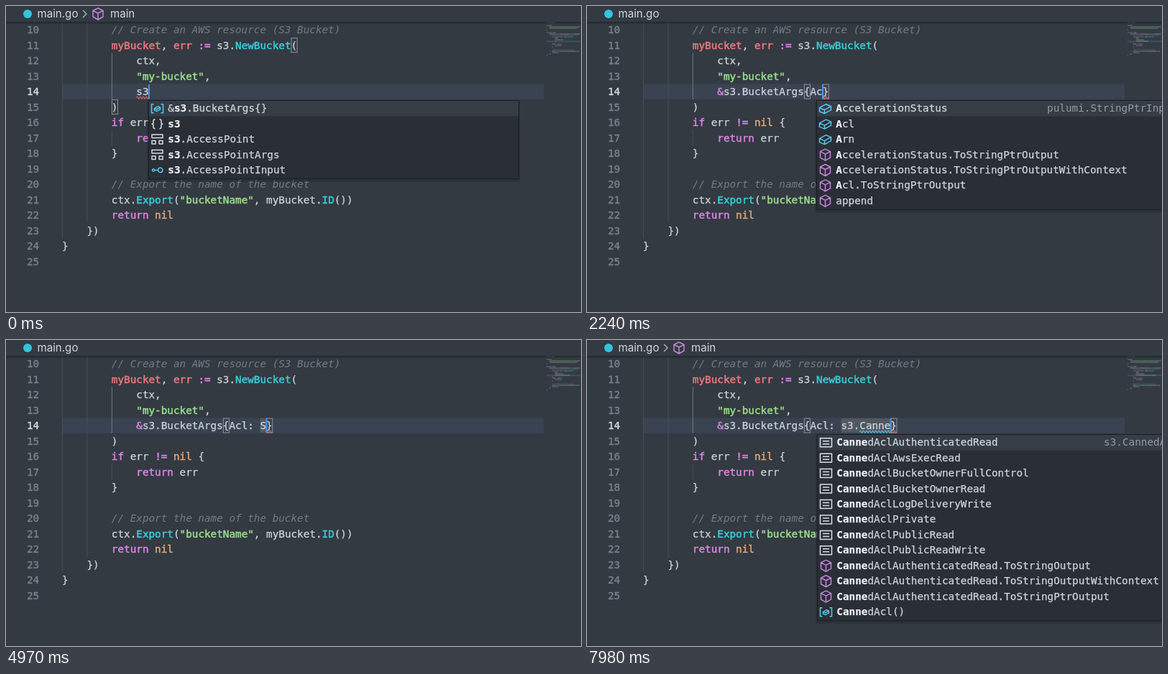
These frames come from a looping animation (800x426 px, 8000 ms). An HTML page:

```html
<!DOCTYPE html>
<html lang="en">
<head>
<meta charset="utf-8">
<title>Editor completion</title>
<style>
html, body { margin: 0; width: 100%; height: 100%; overflow: hidden; background: #333a42; }
svg { display: block; width: 100vw; height: 100vh; }
text { font: 14.3px "DejaVu Sans Mono", monospace; white-space: pre; }
#popup text { font-size: 14.34px; }
.ui { font: 15.1px Inter, sans-serif; fill: #d3d7de; }
.icon { fill: none; stroke-width: 1.5; stroke-linejoin: round; }
</style>
</head>
<body>
<svg viewBox="0 0 800 426">
  <defs>
    <linearGradient id="shade" x2="0" y2="1">
      <stop stop-color="#1d2026" stop-opacity=".75"/>
      <stop offset="1" stop-color="#1d2026" stop-opacity="0"/>
    </linearGradient>
  </defs>
  <rect width="800" height="426" fill="#333a42"/>
  <g id="back"></g>
  <g id="line"></g>
  <g id="map"></g>
  <rect y="22" width="800" height="4" fill="url(#shade)"/>
  <circle cx="30" cy="11" r="6" fill="#35c3dc"/>
  <text class="ui" x="43.5" y="16">main.go</text>
  <g id="crumb">
    <path d="M107 6l5 5-5 5" fill="none" stroke="#aeb4bf" stroke-width="1.4"/>
    <text class="ui" x="145" y="16">main</text>
  </g>
  <g id="popup"></g>
</svg>
<script>
const LOOP = 8000, CW = 8.609, LH = 21.5, ROW = 21.45, LEFT = 78;
const $ = id => document.getElementById(id);
const colors = {
  w: '#d0d4da', c: '#737b86', r: '#ee777e', p: '#dc83e2',
  b: '#38cbd8', g: '#9bdc8c', o: '#e5a577'
};

// Source lines: indent, then "colour:text" parts split by "|"
const lines = [
  '0|p:package|w: main', '', '0|p:import|w: (',
  '4|g:"github.com/pulumi/pulumi-aws/sdk/go/aws/s3"',
  '4|g:"github.com/pulumi/pulumi/sdk/go/pulumi"',
  '0|w:)', '', '0|p:func|b: main|w:() {',
  '4|w:pulumi.|b:Run|w:(|p:func|w:(ctx *pulumi.|b:Context|w:) error {',
  '8|c:// Create an AWS resource (S3 Bucket)',
  '8|r:myBucket|w:, |r:err|p: := |w:s3.|b:NewBucket|w:(',
  '12|w:ctx,', '12|g:"my-bucket"|w:,', '',
  '8|w:)', '8|p:if|w: err |p:!=|o: nil|w: {', '12|p:return|w: err', '8|w:}', '',
  '8|c:// Export the name of the bucket',
  '8|w:ctx.|b:Export|w:(|g:"bucketName"|w:, myBucket.|b:ID|w:())',
  '8|p:return|o: nil', '4|w:})', '0|w:}', ''
];

const icons = {
  cube: ['#c583da', 'M0-8L7-4.5V4L0 8L-7 4V-4.5ZM-7-4.5L0-1L7-4.5M0-1V8'],
  field: ['#5cc4ee', 'M-8-1L1-6L8-3V2L-1 7L-8 4ZM-8-1L-1 2L8-3M-1 2V7'],
  value: ['#5cc4ee', 'M-5-6H-8V6H-5M5-6H8V6H5M-4 0L1-3L4-1.5V1.5L-1 4L-4 2.5ZM-4 0L-1 1.2L4-1.5'],
  braces: ['#d8dce3', 'M-3-6.5Q-5.5-6.5-5.5-4V-2Q-5.5 0-7.5 0Q-5.5 0-5.5 2V4Q-5.5 6.5-3 6.5M3-6.5Q5.5-6.5 5.5-4V-2Q5.5 0 7.5 0Q5.5 0 5.5 2V4Q5.5 6.5 3 6.5'],
  struct: ['#d8dce3', 'M-7.5-6.5H7.5V-2H-7.5ZM-7.5 2H-2.5V6.5H-7.5ZM2.5 2H7.5V6.5H2.5Z'],
  iface: ['#5cc4ee', 'M-7 0a1.6 1.6 0 1 0 3.2 0a1.6 1.6 0 1 0-3.2 0M-4 0H1M1 0a3.2 3.2 0 1 0 6.4 0a3.2 3.2 0 1 0-6.4 0'],
  enum: ['#d8dce3', 'M-8-6H8V6H-8ZM-4.5-2H4.5M-4.5 2H4.5']
};

const rows = (kind, names) => names.split(' ').map(name => [kind, name]);
const status = 'AccelerationStatus', acl = 'Acl.ToStringPtrOutput';
const read = 'CannedAclAuthenticatedRead';
const statusCalls = rows('cube', `${status}.ToStringPtrOutput ${status}.ToStringPtrOutputWithContext ${acl}`);
const hint = ['pulumi.StringPtrInput', 640];
const lists = {
  s3: { x: 198, rows: [['value', '&s3.BucketArgs{}'], ['braces', 's3'],
    ...rows('struct', 's3.AccessPoint s3.AccessPointArgs'), ['iface', 's3.AccessPointInput']] },
  dot: { x: 319, hint: ['func(name pulumi.StringInput, t pulumi.', 488],
    rows: [...rows('cube', 'pulumi.Create… pulumi.Sprintf pulumi.StringPtr'),
      ...rows('value', 'pulumi.ID() pulumi.IDOutput{} pulumi.String() pulumi.StringOutput{} ' +
        'pulumi.StringPtrOutput{} pulumi.URN() pulumi.URNOutput{} s3.CannedAcl() nil')] },
  a: { x: 319, hint,
    rows: [...rows('field', `${status} Acl Arn`), ...statusCalls, ['cube', 'append']] },
  ac: { x: 319, hint, rows: [...rows('field', `${status} Acl`), ...statusCalls] },
  acl: { x: 319, hint, rows: [['field', 'Acl'], ['cube', acl]] },
  canned: { x: 320, hint: ['s3.CannedAcl', 719],
    rows: [...rows('enum', read + ['AwsExecRead', 'BucketOwnerFullControl', 'BucketOwnerRead',
        'LogDeliveryWrite', 'Private', 'PublicRead', 'PublicReadWrite'].map(s => ' CannedAcl' + s).join('')),
      ...rows('cube', ['Output', 'OutputWithContext', 'PtrOutput'].map(s => `${read}.ToString${s}`).join(' ')),
      ['value', 'CannedAcl()']] }
};

// Start time, text before the caret, open list, matched prefix
const args = '&s3.BucketArgs{', field = args + 'Acl: ';
const steps = [
  [0, 's3', 's3', 's3'], [420, args], [1120, args + '.'], [1190, args + '.', 'dot'],
  [1610, args], [1820, args + 'A'], [1890, args + 'A', 'a', 'A'],
  [2170, args + 'Ac', 'a', 'A'], [2310, args + 'Ac', 'ac', 'Ac'],
  [2590, args + 'Acl', 'acl', 'Acl'], [2870, field], [4690, field + 'S'],
  [5250, field], [5530, field + 's'], [5740, field + 's3'],
  [5950, field + 's3.'], [6020, field + 's3.', 'canned'],
  ...[6860, 7140, 7350, 7560, 7770].map((t, i) => {
    const typed = 'Canne'.slice(0, i + 1);
    return [t, field + 's3.' + typed, 'canned', typed];
  })
];

const esc = s => s.replace(/&/g, '&amp;').replace(/</g, '&lt;');
const mid = n => 119.1 + (n - 14) * LH;
const colX = c => LEFT + c * CW;
const text = (x, y, fill, s, more = '') =>
  `<text x="${x}" y="${y + 5}" fill="${fill}" ${more}>${s}</text>`;
const rect = (x, y, w, h, fill, more = '') =>
  `<rect x="${x}" y="${y}" width="${w}" height="${h}" fill="${fill}" ${more}/>`;
const bracket = (col, n) =>
  rect(colX(col) + .5, mid(n) - 10, CW - .5, 20, 'none', 'stroke="#8b929c"');
const icon = (kind, x, y) =>
  `<path class="icon" transform="translate(${x} ${y})" stroke="${icons[kind][0]}" d="${icons[kind][1]}"/>`;
const squiggle = (col, count, color) => {
  let d = `M${colX(col)} ${mid(14) + 8.6}`;
  for (let i = 0; i < count * 2; i++) d += `q${CW / 8}-3 ${CW / 4} 0t${CW / 4} 0`;
  return `<path d="${d}" fill="none" stroke="${color}" stroke-width="1.1"/>`;
};

function parse(line) {
  const [indent, ...parts] = line.split('|');
  return [+indent, parts.map(p => [p[0], p.slice(2)])];
}

function codeLine(line, n) {
  const [indent, parts] = parse(line);
  const spans = parts.map(([k, s]) =>
    `<tspan fill="${colors[k]}" stroke="${colors[k]}" stroke-width="${k === 'c' ? 0 : k === 'w' ? .25 : .5}"` +
    `${k === 'c' ? ' font-style="italic"' : ''}>${esc(s)}</tspan>`).join('');
  return text(colX(indent), mid(n), colors.w, spans);
}

function minimapLine(line, n) {
  const [indent, parts] = parse(line);
  let col = indent;
  return parts.map(([k, s]) => {
    const bar = rect(752 + col * .97, 20.5 + n * 2, s.trim().length * .97, 1.1, colors[k], 'opacity=".42"');
    col += s.length;
    return bar;
  }).join('');
}

function drawBack() {
  const guide = (col, from, to, color) =>
    rect(colX(col), mid(from) - LH / 2, 1, (to - from + 1) * LH, color);
  let out = rect(LEFT, mid(14) - LH / 2, 670, LH, '#3a4351');
  out += guide(0, 10, 23, '#474e57') + guide(4, 10, 22, '#474e57') +
    guide(8, 12, 14, '#717983') + guide(8, 17, 17, '#474e57');
  for (let n = 10; n <= 25; n++) {
    const color = n === 14 ? '#d5d9e0' : '#78818c';
    out += text(29, mid(n), color, n, `stroke="${color}" stroke-width=".4"`) + codeLine(lines[n - 1], n);
  }
  $('back').innerHTML = out;
  $('crumb').innerHTML += icon('cube', 128, 11);
}

function drawLine(typed) {
  const open = typed.includes('{'), caret = 12 + typed.length, slot = 12 + field.length;
  let out = '';
  if (typed.startsWith(field))
    out += rect(colX(slot), mid(14) - 10, Math.max(2, (caret - slot) * CW), 20, '#505862');
  const code = '12|' + (open ? 'p:&|w:' + typed.slice(1) + '}' : 'w:' + typed);
  out += codeLine(code, 14);
  if (open) {
    out += bracket(26, 14) + bracket(caret, 14);
    const name = typed.slice(field.length + 3);
    if (name) out += squiggle(slot + 3, name.length, '#4fc0e8');
    if (typed === args + '.') out += squiggle(27, 1, '#e8605f');
    else if (typed !== args && !typed.endsWith('.')) out += squiggle(caret, 1, '#e8605f');
  } else {
    out += bracket(37, 11) + bracket(8, 15) + squiggle(12, 2, '#e8605f');
  }
  out += rect(colX(caret) - .5, mid(14) - 10, 1.8, 20, '#4d9bf5');
  $('line').innerHTML = out;
  $('map').innerHTML = lines.map((l, i) => minimapLine(i === 13 ? code : l, i + 1)).join('') +
    rect(752, 48.4, 48, 2, '#4a7fa8', 'opacity=".3"');
}

function label(name, match) {
  const at = match ? name.indexOf(match) : -1;
  if (at < 0) return esc(name);
  return esc(name.slice(0, at)) + `<tspan font-weight="bold" fill="#f4f6f9">${match}</tspan>` +
    esc(name.slice(at + match.length));
}

function drawPopup(list, match) {
  if (!list) return '';
  const { x, rows, hint } = list, top = 131.5, w = 515, h = rows.length * ROW + 2;
  let out = rect(x - 2, top + 1, w + 4, h + 3, '#1c1f25', 'opacity=".3"') +
    rect(x + .5, top, w, h, '#2a2f36', 'stroke="#1b1e23"') +
    rect(x + 1, top + .5, w - 1, ROW, '#363d47');
  rows.forEach(([kind, name], i) => {
    const y = 142.2 + i * ROW;
    out += icon(kind, x + 12.5, y + .5) +
      text(x + 27.3, y, '#d0d4da', label(name, match), 'stroke="#d0d4da" stroke-width=".25"');
  });
  if (hint) out += text(hint[1], 142.2, '#949ba5', hint[0]);
  return out;
}

let shown = null;
function render(t) {
  const step = steps.findLast(s => s[0] <= t);
  $('crumb').style.display = t >= 840 && t < 5880 ? 'none' : '';
  if (step === shown) return;
  shown = step;
  drawLine(step[1]);
  $('popup').innerHTML = drawPopup(lists[step[2]], step[3]);
}

function tick(now) {
  render(now % LOOP);
  requestAnimationFrame(tick);
}

drawBack();
render(0);
requestAnimationFrame(tick);
</script>
</body>
</html>
```
